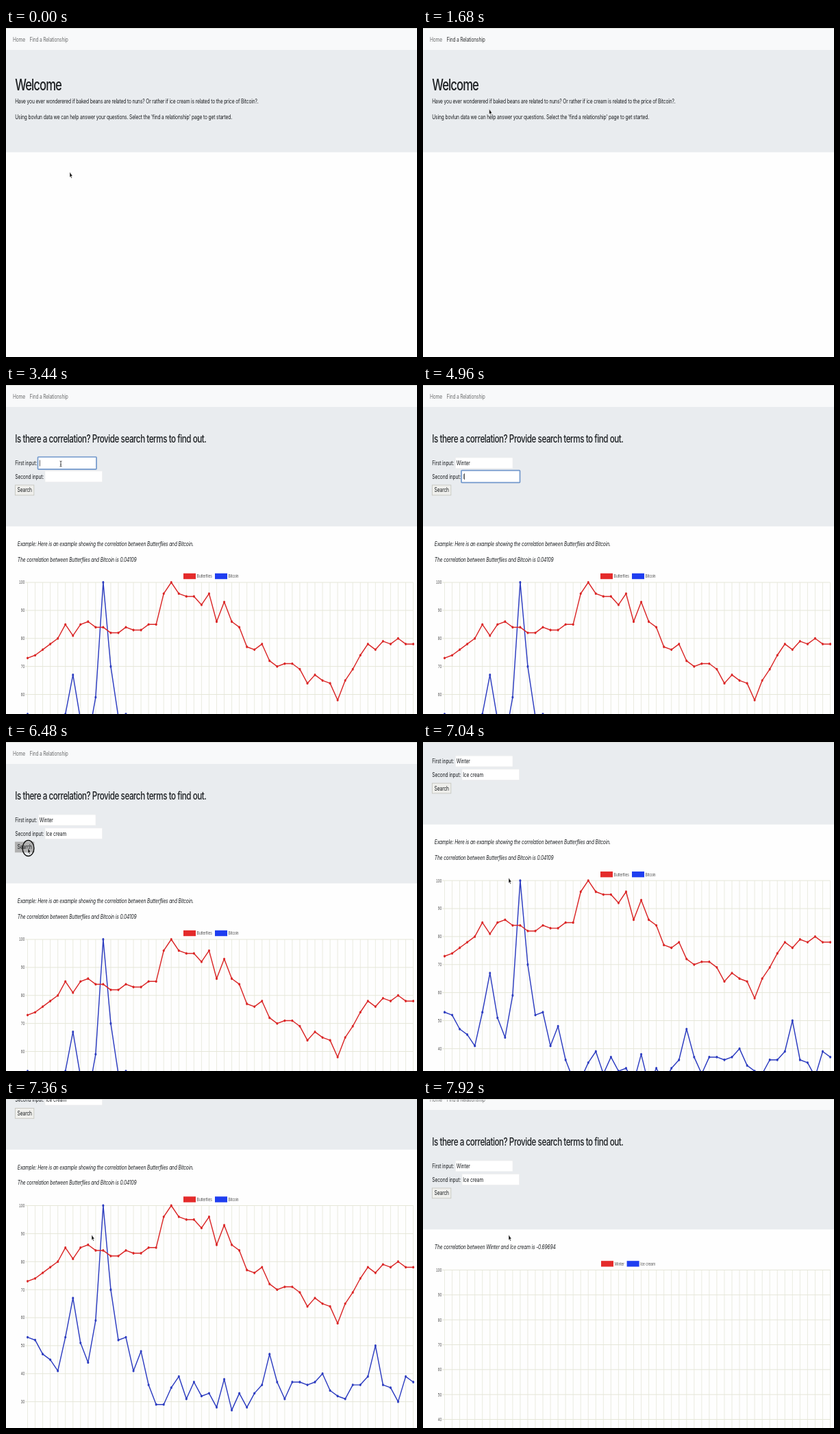
Write an HTML page that moves like this. It is 600 px wide and 480 px high and loops after 8000 ms.

```html
<!DOCTYPE html>
<html lang="en">
<head>
<meta charset="utf-8">
<title>Find a Relationship</title>
<style>
  html, body { margin: 0; width: 100%; height: 100%; overflow: hidden; background: #fefefe; }
  svg { display: block; width: 600px; height: 480px; }
  text { font: 16px Inter, "Open Sans", sans-serif; letter-spacing: -.02em; fill: #1c1f22; white-space: pre; }
  .h1 { font-size: 40px; font-weight: 500; letter-spacing: -.054em; }
  .h3 { font-size: 28px; font-weight: 500; letter-spacing: -.039em; }
  .em { font-style: italic; letter-spacing: -.0225em; }
  .nav { fill: #707172; letter-spacing: -.026em; }
  .nav.hot { fill: #353637; }
  .tick { font: 12px "Liberation Sans", Arial, sans-serif; letter-spacing: 0; fill: #565656; }
  .end { text-anchor: end; }
  .panel { fill: #e9ecef; }
  .grid { stroke: #e5e6d8; fill: none; }
  .line { fill: none; stroke-width: 1.45; stroke-linejoin: round; }
  .field { fill: #fff; stroke: #eeeeee; stroke-width: .7; }
  .field.on { stroke: #7298cc; stroke-width: 1.7; }
  .btn { fill: #efefec; stroke: #c6c6c0; stroke-width: .9; }
  .btn.down { fill: #b0b0b0; stroke: #b0b0b0; }
</style>
</head>
<body>
<svg id="stage" viewBox="0 0 600 480"></svg>
<script>
const LOOP = 8000, STEP = 80, SX = 1440 / 3456, SY = .565;
const RED = '#da2626', BLUE = '#2c3cc0', KEY_RED = '#e42b2b', KEY_BLUE = '#1f3ef0';
const X0 = 31.5, DX = 11.04, COUNT = 52, CHART_H = 327;
const LOADED = 1920, ANSWERED = 7840;
const butterflies = [73,74,76,78,80,85,81,85,86,84,84,82,82,84,83,83,85,85,96,100,96,95,95,92,96,86,
  93,86,84,77,76,78,72,70,71,71,69,64,67,65,64,58,65,69,74,78,76,79,78,80,78,78];
const bitcoin = [53,52,47,45,41,53,67,51,44,59,100,70,52,53,41,48,36,29,29,35,39,31,37,32,33,28,
  38,27,33,28,33,36,47,37,31,37,37,36,37,40,34,32,31,36,36,39,50,36,35,30,39,37];

const stage = document.getElementById('stage');

function add(parent, tag, attrs = {}) {
  const el = document.createElementNS('http://www.w3.org/2000/svg', tag);
  for (const k in attrs) el.setAttribute(k, attrs[k]);
  return parent.appendChild(el);
}
function label(parent, x, y, str, cls = '') {
  const el = add(parent, 'text', { transform: `translate(${x} ${y}) scale(${SX} ${SY})`, class: cls });
  el.textContent = str;
  return el;
}
function box(parent, x, y, width, height, attrs) {
  return add(parent, 'rect', { x, y, width, height, ...attrs });
}
const show = (el, on) => el.setAttribute('visibility', on ? 'inherit' : 'hidden');

function grid(parent, top, min) {
  const rows = (100 - min) / 10, gap = CHART_H / rows;
  let d = '';
  for (let i = 0; i < COUNT; i++) d += `M${X0 + i * DX} ${top}v${CHART_H + 4}`;
  add(parent, 'path', { d, class: 'grid', 'stroke-width': .8 });
  d = '';
  for (let i = 0; i <= rows; i++) {
    const y = top + i * gap;
    d += `M28 ${y}H594.6`;
    label(parent, 27.4, y + 2.4, 100 - i * 10, 'tick end');
  }
  add(parent, 'path', { d, class: 'grid' });
}
function key(parent, x, y, color, name) {
  box(parent, x, y - 4.2, 18, 8.4, { fill: color });
  label(parent, x + 19.6, y + 2.4, name, 'tick');
}
function series(parent, data, color, top, min) {
  const line = add(parent, 'path', { class: 'line', stroke: color });
  const dots = data.map((v, i) => add(parent, 'ellipse', { cx: X0 + i * DX, rx: 1.5, ry: 1.9, fill: color }));
  return grow => {
    const ys = data.map(v => top + CHART_H - grow * CHART_H * (v - min) / (100 - min));
    line.setAttribute('d', 'M' + ys.map((y, i) => `${X0 + i * DX} ${y}`).join('L'));
    dots.forEach((dot, i) => dot.setAttribute('cy', ys[i]));
  };
}

// page
const page = add(stage, 'g');
box(page, 0, 0, 600, 32, { fill: '#f8f9fa' });
label(page, 10, 20, 'Home', 'nav');
const link = label(page, 34.5, 20, 'Find a Relationship', 'nav');

const home = add(page, 'g');
box(home, 0, 32, 600, 149.3, { class: 'panel' });
label(home, 13.2, 90.7, 'Welcome', 'h1');
label(home, 13.3, 110.1, 'Have you ever wonderered if baked beans are related to nuns? Or rather if ice cream is related to the price of Bitcoin?.');
label(home, 13.3, 132.7, "Using bovlun data we can help answer your questions. Select the 'find a relationship' page to get started.");

const form = add(page, 'g');
box(form, 0, 32, 600, 174.3, { class: 'panel' });
label(form, 13.2, 83.5, 'Is there a correlation? Provide search terms to find out.', 'h3');

function field(name, x, y) {
  label(form, 13.3, y + 3.3, name);
  const rect = add(form, 'rect', { rx: .8 });
  const text = label(form, x + 1.2, y + 3.3, '');
  const caret = box(form, 0, y - 4.5, .8, 9, { fill: '#333' });
  return (value, focused, blink) => {
    const p = focused ? 1 : 0;
    const size = { x: x - p, y: y - 8 - p, width: 83.5 + 2 * p, height: 15.8 + 2 * p };
    for (const k in size) rect.setAttribute(k, size[k]);
    rect.setAttribute('class', focused ? 'field on' : 'field');
    text.textContent = value;
    caret.setAttribute('x', x + 1.4 + (value ? text.getComputedTextLength() * SX : 0));
    show(caret, focused && blink);
  };
}
const first = field('First input:', 47.5, 114);
const second = field('Second input:', 57, 133.6);
const button = box(form, 13.4, 146, 27.4, 14.8, { class: 'btn' });
label(form, 16.6, 156.4, 'Search');

const example = add(page, 'g');
label(example, 16.8, 235.2, 'Example: Here is an example showing the correlation between Butterflies and Bitcoin.', 'em');
label(example, 16.8, 257.7, 'The correlation between Butterflies and Bitcoin is 0.04109', 'em');
key(example, 259, 279, KEY_RED, 'Butterflies');
key(example, 305, 279, KEY_BLUE, 'Bitcoin');
grid(example, 288, 20);
const drawBlue = series(example, bitcoin, BLUE, 288, 20);
const drawRed = series(example, butterflies, RED, 288, 20);

const result = add(page, 'g');
label(result, 16.8, 235.2, 'The correlation between Winter and Ice cream is -0.69694', 'em');
key(result, 260, 256.4, KEY_RED, 'Winter');
key(result, 297.6, 256.4, KEY_BLUE, 'Ice cream');
grid(result, 265.5, 10);

box(stage, 0, 0, 600, 1, { fill: '#dfe0dc' });

// pointer
const pointer = add(stage, 'g');
const ring = add(pointer, 'ellipse', { cx: .5, cy: .5, rx: 8.4, ry: 11.5, fill: 'none', stroke: '#111', 'stroke-width': 1.4 });
const arrow = add(pointer, 'path', { d: 'M0 0V8L1.3 6.5 2.4 9.2 3.4 8.6 2.4 6.1H4.2Z', fill: '#111', stroke: '#fff', 'stroke-width': .5 });
const beam = add(pointer, 'path', { d: 'M-1.5-4Q0-4 0-3 0-4 1.5-4M0-3V3M-1.5 4Q0 4 0 3 0 4 1.5 4M-.8 1H.8', fill: 'none', stroke: '#222', 'stroke-width': .8 });

// keys are [time, ...values], eased in between
function track(keys, t) {
  if (t <= keys[0][0]) return keys[0].slice(1);
  const i = keys.findIndex(k => k[0] > t);
  if (i < 0) return keys[keys.length - 1].slice(1);
  const a = keys[i - 1], b = keys[i];
  const u = (t - a[0]) / (b[0] - a[0]), e = u * u * (3 - 2 * u);
  return a.slice(1).map((v, n) => v + (b[n + 1] - v) * e);
}
const path = [[80, 93, 210], [880, 62, 17], [1240, 62, 17], [1760, 99, 125], [2160, 99, 125], [2720, 80, 115],
  [5920, 80, 115], [6320, 32, 154.5], [6560, 32, 154.5], [6880, 125, 198]];
const scroll = [[6800, 0], [7200, 132.5]];
const settle = [[ANSWERED - 80, 0], [ANSWERED + 80, 16]];
const within = (t, a, b) => t >= a && t < b;
const typed = (word, t, start, pace) => word.slice(0, Math.max(0, Math.floor((t - start) / pace) + 1));

function render(t) {
  const onHome = t < LOADED, done = t >= ANSWERED;
  const top = track(done ? settle : scroll, t)[0];
  page.setAttribute('transform', `translate(0 ${-top})`);
  show(home, onHome);
  show(form, !onHome);
  show(example, !onHome && !done);
  show(result, done);
  link.setAttribute('class', within(t, 800, LOADED) ? 'nav hot' : 'nav');

  const grow = 1 - Math.pow(1 - Math.min(1, Math.max(0, (t - LOADED) / 1000)), 4);
  drawBlue(grow);
  drawRed(grow);

  const blink = !onHome && (t >= 3600 || Math.floor((t - 2960) / 500) % 2 === 0);
  first(typed('Winter', t, 3760, 120), within(t, 2960, 4640), blink);
  second(typed('Ice cream', t, 4880, 110), within(t, 4640, 6400), blink);
  button.setAttribute('class', within(t, 6400, 6560) ? 'btn down' : 'btn');

  const [x, y] = track(path, t);
  const overField = !onHome && top === 0 &&
    ((within(x, 47, 131) && within(y, 106, 122)) || (within(x, 57, 141) && within(y, 126, 142)));
  pointer.setAttribute('transform', `translate(${x} ${y})`);
  show(pointer, !within(t, 3760, 5920));
  show(arrow, !overField);
  show(beam, overField);
  show(ring, within(t, 1040, 1200) || within(t, 2880, 3040) || within(t, 6400, 6560));
}

const start = performance.now();
let last = -1;
function frame() {
  const t = Math.floor(((performance.now() - start) % LOOP) / STEP) * STEP;
  if (t !== last) render(last = t);
  requestAnimationFrame(frame);
}
frame();
</script>
</body>
</html>
```
